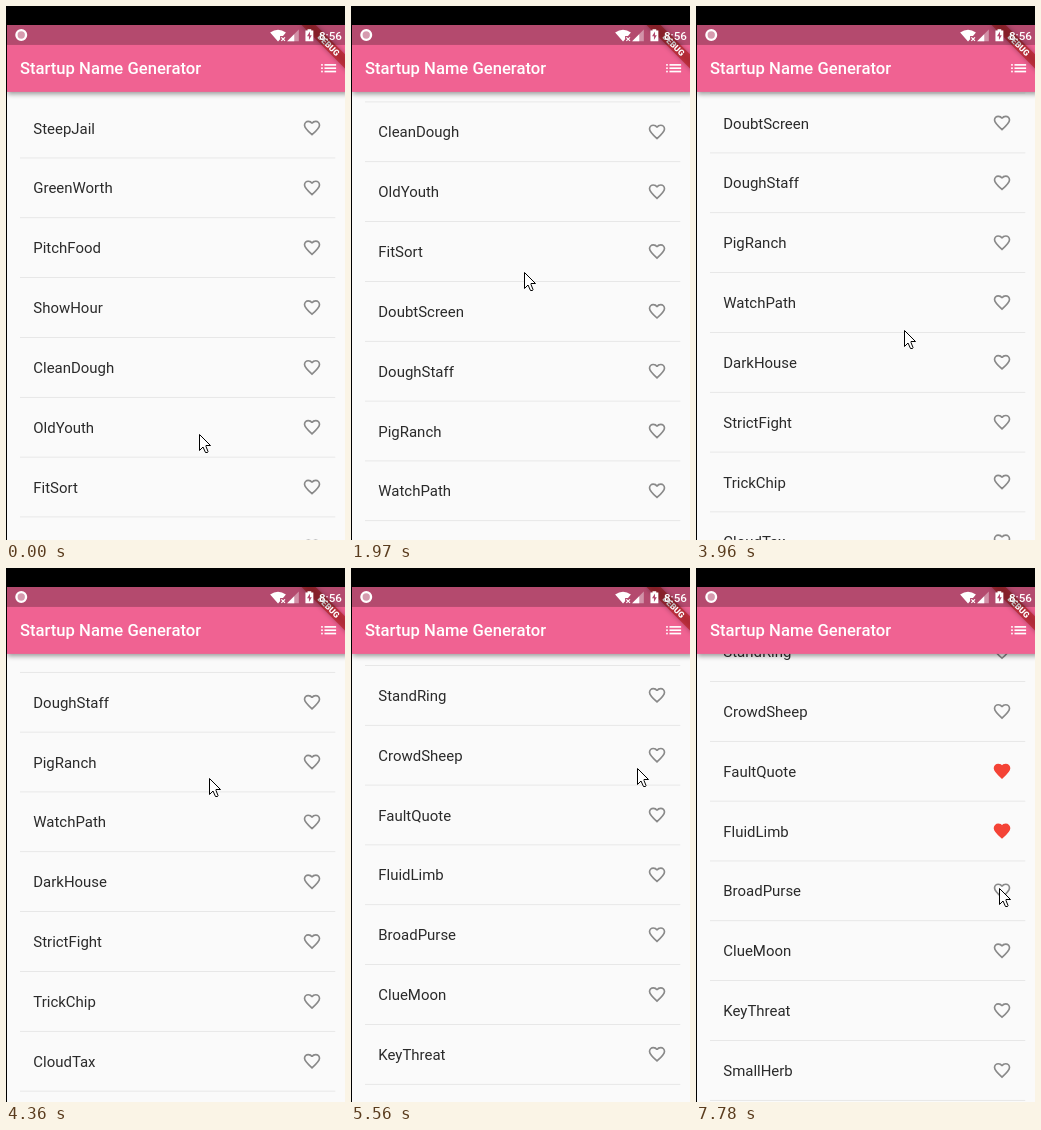
Write an HTML page with a canvas that moves like this. It is 339 by 534 pixels and loops after 8 s.

```html
<!DOCTYPE html>
<html lang="en">
<head>
<meta charset="utf-8">
<title>Startup Name Generator</title>
<style>
  html, body { margin: 0; height: 100%; overflow: hidden; background: #000; }
  canvas { display: block; }
</style>
</head>
<body>
<canvas id="stage" width="339" height="534"></canvas>
<script>
const ctx = document.getElementById('stage').getContext('2d');
const LOOP = 8000;
const HOLD = 135;              // the screen refreshes this often, in ms
const DP = 0.831;              // stage pixels per layout unit
const LEFT = 0.7, TOP = 19;    // corner of the phone screen
const WIDTH = 411.4, ROW = 72;

const names = `SteepJail GreenWorth PitchFood ShowHour CleanDough OldYouth FitSort
  DoubtScreen DoughStaff PigRanch WatchPath DarkHouse StrictFight TrickChip CloudTax
  ThickFan BeachClass CropGuard SwordPoll SkiTrait GrayCave BearFood
  StandRing CrowdSheep FaultQuote FluidLimb BroadPurse ClueMoon KeyThreat SmallHerb`.split(/\s+/);
const likedAt = { FaultQuote: 6380, FluidLimb: 7050 };

const flicks = [
  { from: 1560, to: 2510, distance: 288.5 },
  { from: 2915, to: 3230, distance: -169.4 },
  { from: 3555, to: 4360, distance: 347.4 },
  { from: 4781, to: 6011, distance: 888.3 }
];

// Where the pointer turns: time, x, y
const turns = [
  [0, 193, 428], [870, 215, 482], [1295, 215, 482], [1970, 173, 266],
  [2390, 181, 208], [2915, 181, 205], [3050, 212, 406], [3410, 214, 440],
  [3555, 214, 440], [4360, 203, 210], [4780, 197, 405], [5020, 193, 198],
  [5560, 286, 200], [6100, 305, 204], [6790, 314, 262], [7780, 303, 320]
];

const heart = new Path2D('M12 20C6 14.7 3 11.8 3 8.5 3 6 5 4 7.5 4 9.4 4 11.2 5.1 12 6.4 12.8 5.1 14.6 4 16.5 4 19 4 21 6 21 8.5 21 11.8 18 14.7 12 20Z');
const wifi = new Path2D('M317 9Q326.5 2.5 336 9L332.5 13.2H329V17.2L326.5 20Z');
const wifiCross = new Path2D('M330.5 14.8l4.4 4.4m0-4.4l-4.4 4.4');
const signal = new Path2D('M337.5 19.5H351.5V5.5Z');
const signalLevel = new Path2D('M337.5 19.5H346V11Z');
const battery = new Path2D('M359.5 6.5H362V5H366.5V6.5H369V19.5H359.5Z');
const bolt = new Path2D('M365 7.8L361.4 13.6H363.7V18L367.2 12.2H365Z');
const arrow = new Path2D('M.5.5V16.5L4 13 6.5 18.5H8.5L9 17.5 7 12.5V11.5H11.5Z');

const clamp = p => Math.min(1, Math.max(0, p));
const easeOut = p => 1 - (1 - p) ** 3;

function scrollAt(t) {
  return flicks.reduce((sum, { from, to, distance }) =>
    sum + distance * easeOut(clamp((t - from) / (to - from))), 0);
}

function lastTurn(t) {
  return turns.findLastIndex(turn => turn[0] <= t);
}

function pointerAt(t) {
  const i = lastTurn(t);
  const [t0, x0, y0] = turns[i];
  const [t1, x1, y1] = turns[i + 1] ?? [LOOP, x0, y0];
  const p = (t - t0) / (t1 - t0);
  return [x0 + (x1 - x0) * p, y0 + (y1 - y0) * p];
}

function fill(color, shape) {
  ctx.fillStyle = color;
  ctx.fill(shape);
}

function stroke(color, width, shape) {
  ctx.strokeStyle = color;
  ctx.lineWidth = width;
  ctx.stroke(shape);
}

function rect(color, x, y, w, h) {
  ctx.fillStyle = color;
  ctx.fillRect(x, y, w, h);
}

function text(str, x, y, size, weight, color, align = 'left') {
  ctx.font = `${weight} ${size}px Roboto, sans-serif`;
  ctx.textAlign = align;
  ctx.fillStyle = color;
  ctx.fillText(str, x, y);
}

function shadow(color, blur, y) {
  ctx.shadowColor = color;
  ctx.shadowBlur = blur;
  ctx.shadowOffsetY = y;
}

function drawHeart(x, y, liked) {
  const color = liked ? '#f44336' : '#898989';
  ctx.save();
  ctx.translate(x, y);
  ctx.miterLimit = 1.6;
  stroke(color, 2, heart);
  if (liked) fill(color, heart);
  ctx.restore();
}

function drawList(t) {
  rect('#fafafa', 0, 0, WIDTH, 640);
  ctx.save();
  ctx.translate(0, -scrollAt(t) / DP);
  names.forEach((name, i) => {
    const y = 124 + ROW * i;
    text(name, 32, y + 6.65, 18, 400, '#2a2a2a');
    rect('#dedede', 16, y + 35.6, WIDTH - 32, 0.8);
    drawHeart(WIDTH - 56, y - 12, t >= likedAt[name]);
  });
  ctx.restore();
}

function drawAppBar() {
  shadow('rgba(0,0,0,.4)', 5, 2);
  rect('#f06292', 0, 0, WIDTH, 80.5);
  shadow('transparent', 0, 0);
  text('Startup Name Generator', 16, 58.8, 20, 500, '#fff');
  for (const y of [47, 51, 55]) {
    rect('#fff', 378.4, y, 2, 2);
    rect('#fff', 382.4, y, 14, 2);
  }
}

function drawBanner() {
  ctx.save();
  ctx.translate(WIDTH, 0);
  ctx.rotate(Math.PI / 4);
  shadow('rgba(0,0,0,.5)', 5, 0);
  rect('rgba(183,28,28,.63)', -40, 28, 80, 12);
  shadow('transparent', 0, 0);
  text('DEBUG', 0, 37.6, 10.2, 900, '#fff', 'center');
  ctx.restore();
}

function drawStatusBar() {
  rect('rgba(0,0,0,.25)', 0, 0, WIDTH, 24);
  const dot = new Path2D();
  dot.arc(17.5, 12, 5.8, 0, 7);
  fill('rgba(255,255,255,.45)', dot);
  stroke('#fff', 2.8, dot);
  fill('#fff', wifi);
  stroke('#fff', 1.4, wifiCross);
  fill('rgba(255,255,255,.4)', signal);
  fill('#fff', signalLevel);
  fill('#fff', battery);
  fill('#b44a6e', bolt);
  text('8:56', WIDTH - 8, 17.8, 14, 500, '#fff', 'right');
}

function drawPointer(x, y) {
  ctx.save();
  ctx.translate(Math.round(x), Math.round(y));
  fill('#fff', arrow);
  stroke('#000', 1, arrow);
  ctx.restore();
}

function frame() {
  const now = performance.now() % LOOP;
  const start = turns[lastTurn(now)][0];
  const t = now - (now - start) % HOLD;
  ctx.save();
  ctx.translate(LEFT, TOP);
  ctx.scale(DP, DP);
  drawList(t);
  drawAppBar();
  drawBanner();
  drawStatusBar();
  ctx.restore();
  rect('#000', 0, 0, 339, TOP);
  rect('#000', 0, 0, 1, 534);
  drawPointer(...pointerAt(t));
  requestAnimationFrame(frame);
}
frame();
</script>
</body>
</html>
```
